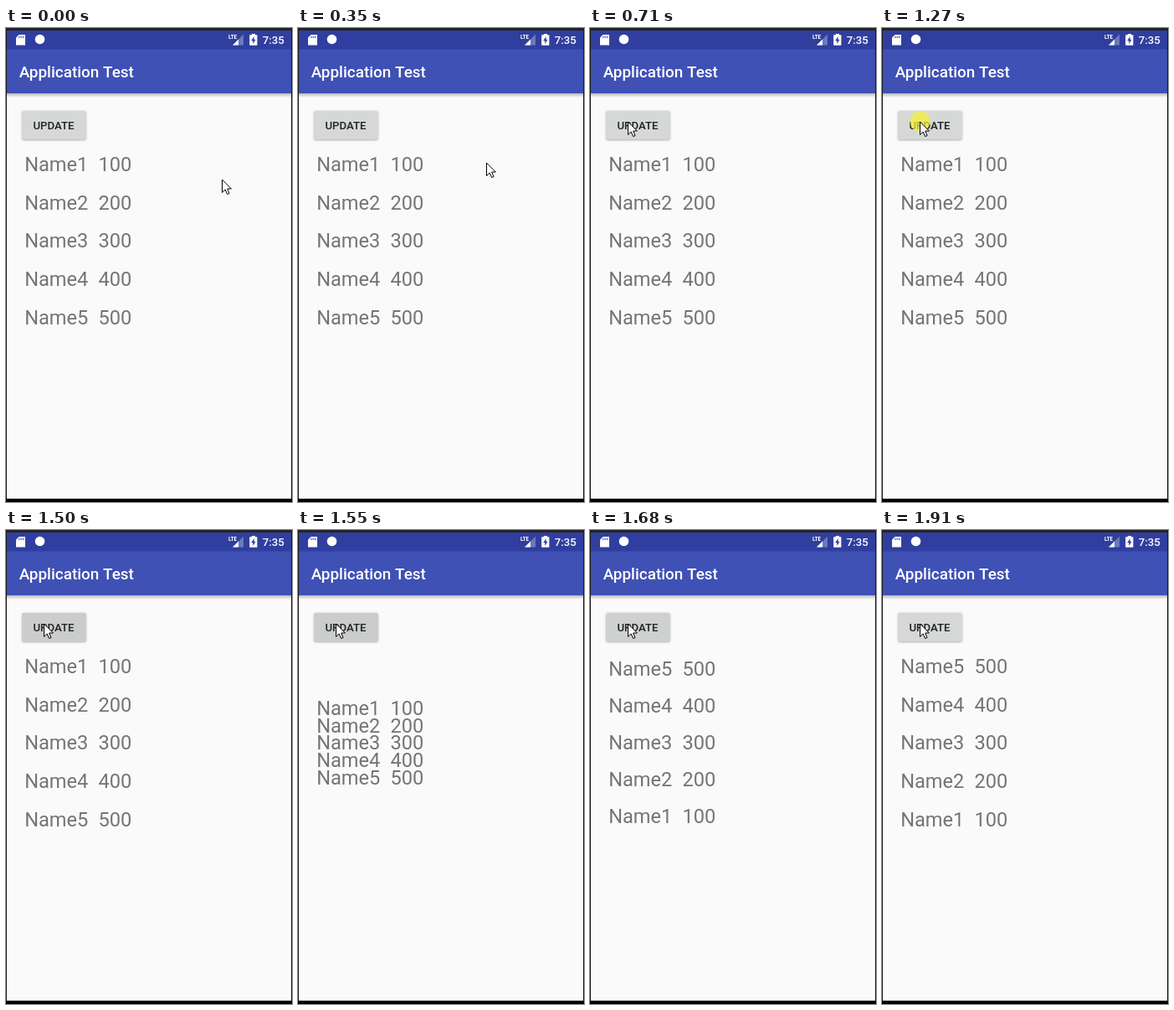
These frames come from a looping animation (342x566 px, 2700 ms). An HTML page with a canvas:

```html
<!DOCTYPE html>
<html lang="en">
<head>
<meta charset="utf-8">
<title>Application Test</title>
<style>
  html, body { margin: 0; width: 100%; height: 100%; overflow: hidden; background: #fafafa; }
  canvas { display: block; width: 342px; height: 566px; }
</style>
</head>
<body>
<canvas id="stage" width="342" height="566"></canvas>
<script>
const ctx = document.getElementById('stage').getContext('2d');
const LOOP = 2700;
const MOVE_STEPS = [300, 340, 390, 440, 480, 530, 580, 620, 660, 710];
const LIST_STEPS = [1370, 1460, 1510, 1550, 1600, 1630, 1680, 1730, 1780];
const BUTTON_SHADES = ['#d6d7d7', '#d0d2d1', '#cbcdcc', '#cbcdcc', '#cbcdcc', '#cbcdcc', '#cdcfce', '#cfd1d0', '#d3d4d4', '#d6d7d7'];
const SHUFFLE_START = 1469, SHUFFLE_TIME = 231;

const passed = (steps, t) => steps.filter(s => s <= t).length;
const clamp = v => Math.min(1, Math.max(0, v));
const smooth = v => v * v * (3 - 2 * v);

function rect(x, y, w, h, color) {
  ctx.fillStyle = color;
  ctx.fillRect(x, y, w, h);
}

function poly(points, fill, stroke) {
  ctx.beginPath();
  points.forEach(([x, y]) => ctx.lineTo(x, y));
  ctx.closePath();
  ctx.fillStyle = fill;
  ctx.fill();
  if (stroke) {
    ctx.strokeStyle = stroke;
    ctx.lineWidth = 1;
    ctx.stroke();
  }
}

function disc(x, y, r, color) {
  ctx.beginPath();
  ctx.arc(x, y, r, 0, Math.PI * 2);
  ctx.fillStyle = color;
  ctx.fill();
}

function text(str, x, y, size, color, weight = 400) {
  ctx.font = `${weight} ${size}px Roboto, sans-serif`;
  ctx.fillStyle = color;
  ctx.fillText(str, x, y);
}

function drawStatusIcons() {
  // memory card
  poly([[15.5, 8], [23, 8], [23, 20.5], [12, 20.5], [12, 11.5]], '#fff');
  for (const x of [15.3, 17.6, 19.9]) rect(x, 9.5, 1, 2.6, '#303f9f');
  disc(40.5, 13.5, 5.8, '#fff');
  // mobile signal
  poly([[284, 7.5], [284, 20.5], [271, 20.5]], 'rgba(255,255,255,.3)');
  poly([[278, 13.5], [278, 20.5], [271, 20.5]], '#fff');
  rect(266, 6, 11, 8, '#303f9f');
  ctx.font = '700 7px "Roboto Condensed", Roboto, sans-serif';
  ctx.fillStyle = '#fff';
  ctx.fillText('LTE', 266, 13, 10);
  // battery
  rect(293.8, 7, 4.2, 2, '#fff');
  rect(291.2, 8.3, 9.2, 12.4, '#fff');
  poly([[296.6, 10], [293.2, 15.2], [295.3, 15.2], [295.3, 19], [298.6, 13.8], [296.6, 13.8]], '#303f9f');
}

function drawFrame() {
  rect(0, 0, 342, 566, '#fafafa');
  const shade = ctx.createLinearGradient(0, 78, 0, 83);
  shade.addColorStop(0, 'rgba(0,0,0,.26)');
  shade.addColorStop(1, 'rgba(0,0,0,0)');
  rect(1, 78, 340, 5, shade);
  rect(1, 25, 340, 53, '#3f51b5');
  rect(1, 3, 340, 22.5, '#303f9f');
  rect(0, 0, 342, 3, '#242424');
  rect(0, 0, 1, 566, '#1c1c1c');
  rect(341, 0, 1, 566, '#1c1c1c');
  rect(0, 562, 342, 4, '#000');
  drawStatusIcons();
  text('7:35', 306.7, 19, 13.2, '#fff', 500);
  text('Application Test', 15.7, 59, 18.9, '#fff', 500);
}

function drawButton(color) {
  ctx.save();
  ctx.shadowColor = 'rgba(0,0,0,.3)';
  ctx.shadowBlur = 2.5;
  ctx.shadowOffsetY = 1;
  ctx.beginPath();
  ctx.roundRect(19.2, 98.7, 76.4, 34.2, 2);
  ctx.fillStyle = color;
  ctx.fill();
  ctx.restore();
  text('UPDATE', 32.4, 121, 13.2, '#212222', 500);
}

function drawList(t) {
  const p = clamp((t - SHUFFLE_START) / SHUFFLE_TIME);
  const spread = 45.6 * Math.cos(Math.PI * p);
  for (let i = 1; i <= 5; i++) {
    const y = 262.3 + (i - 3) * spread;
    text('Name' + i, 22.2, y, 23.6, '#757575');
    text(i + '00', 110.4, y, 23.6, '#757575');
  }
}

function drawCursor(t) {
  const u = passed(MOVE_STEPS, t) / MOVE_STEPS.length;
  const x = Math.round(258 - 213 * smooth(u ** 0.86));
  const y = Math.round(180 - 69 * smooth(u ** 0.64));
  ctx.save();
  ctx.translate(x, y);
  poly([[0.5, 1], [0.5, 16.5], [4.2, 13], [6.6, 18.5], [9, 17.5], [6.7, 12], [11.4, 12]], '#fff', '#000');
  ctx.restore();
}

function render(t) {
  const step = passed(LIST_STEPS, t);
  drawFrame();
  drawButton(BUTTON_SHADES[step]);
  drawList(step ? LIST_STEPS[step - 1] : 0);
  if (t >= 1270 && t < 1370) disc(45.5, 111.5, 12, 'rgba(243,242,45,.7)');
  drawCursor(t);
}

const start = performance.now();
function tick() {
  render((performance.now() - start) % LOOP);
  requestAnimationFrame(tick);
}
tick();
</script>
</body>
</html>
```
